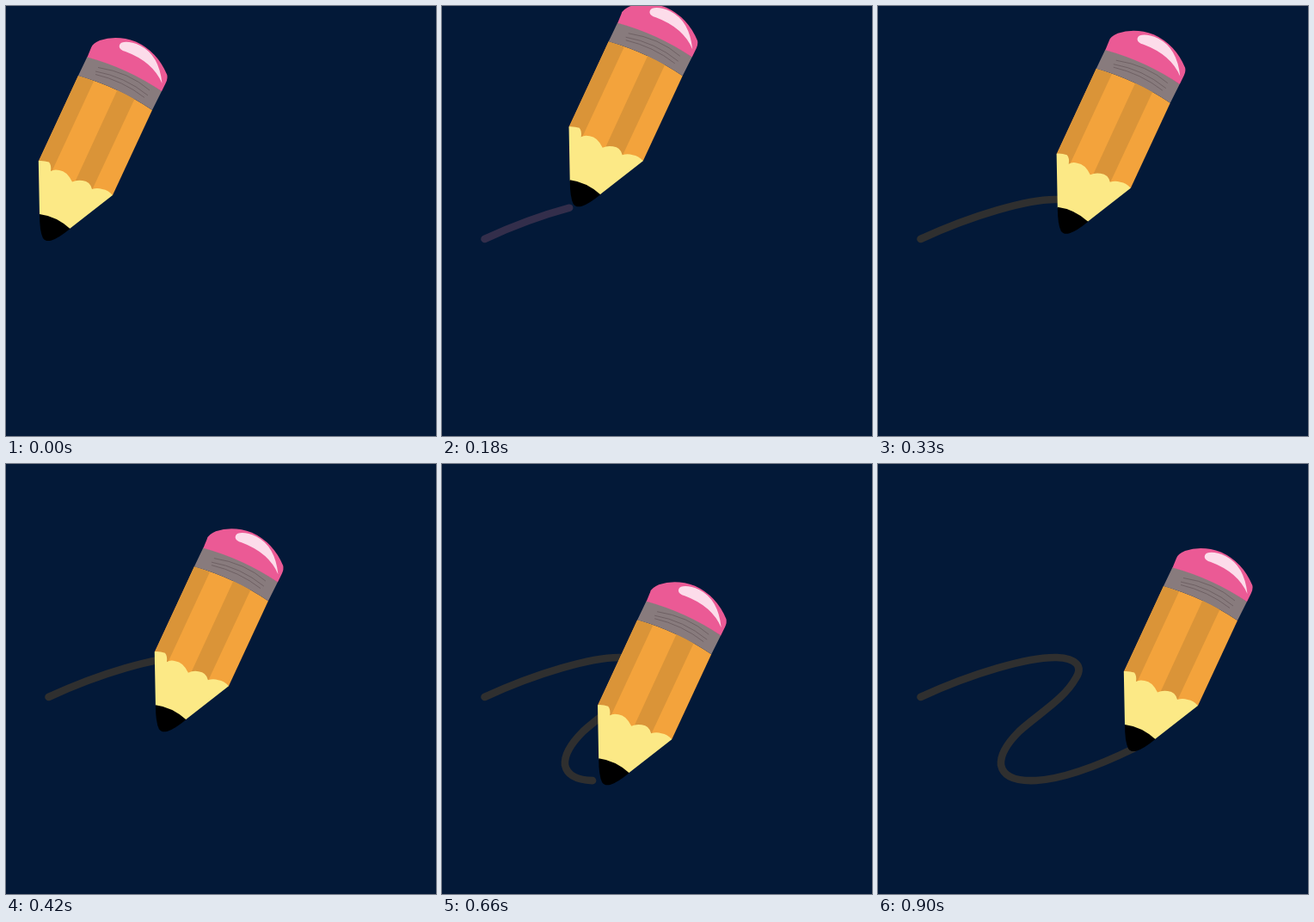
Animation, 500 px wide and 500 px high, one loop 1410 ms. Source, as an HTML page:

```html
<!DOCTYPE html>
<html lang="en">
<head>
<meta charset="utf-8">
<title>Pencil drawing a curve</title>
<style>
  html, body { margin: 0; width: 100%; height: 100%; overflow: hidden; background: #031938; }
  svg { display: block; width: 100%; height: 100%; }
</style>
</head>
<body>
<svg viewBox="0 0 500 500">
  <rect width="500" height="500" fill="#031938"/>
  <path id="line" fill="none" stroke-width="8.6" stroke-linecap="round"
    d="M49.5 271C110 243 176 224 208 225C230 226 239 235 230 249C216 274 187 290 164 311C150 325 142 339 143 350C146 365 164 369 184 368C218 366 262 348 297 331"/>
  <g id="pencil">
    <path fill="#f3a33c" d="M84 81Q130 94 170 121L124 220L80 215L38 180Z"/>
    <path fill="#da9438" d="M84 81Q93 83.5 102 87.5L53 193L38 181ZM129.5 97.5Q140 102 149.5 108L100 214L80 205Z"/>
    <path id="wood" d="M37.8 180Q44 179.5 50 181.5Q53 185 52 192Q56 189.5 62 191Q71 192 77 204.5Q82 202 89 203Q98 204 100 213Q106 211 112 213Q119 214 124 220L74 259L39 243Z"/>
    <path d="M39 242Q58.5 244.5 74.5 259Q61 270 53 272.5Q46 274.5 43 270Q39 262 39 242Z"/>
    <path fill="#887b7d" d="M94.5 59Q142 71 181 99L170 121Q130 94 84 81Z"/>
    <g fill="none" stroke="#6f6164">
      <path d="M107 71.5Q143 77 167 98"/>
      <path d="M104 76Q138 82 165 104"/>
      <path d="M104 79.5Q136 87 161 106.5"/>
    </g>
    <path fill="#eb5a95" d="M94.5 59.5L99 48.5Q100 44 109 40Q129 33.5 151 41.5Q176 53 187.3 80Q188.3 84 186 89L181 99.3Q142 72.5 94.5 59.5Z"/>
    <path fill="#fcdcea" d="M137 42Q145 41 156 46Q178 57 181.5 90Q171 65 139 53Q132 51 131.7 47Q132 42.5 137 42Z"/>
  </g>
</svg>
<script>
  const STEP = 30, LOOP = 1410;   // ms
  const STROKE = 10, LAST = 30;   // steps
  const SPEED = 17.5;             // line length drawn per step

  // Pencil path: one cubic curve per hand stroke, each starting where the last ended
  const start = [0, 0], turn = [174, -24], low = [117, 110], end = [248, 61];
  const strokes = [
    [start, [51, -6], [133, -76], turn],
    [turn, [170, 28], [57, 84], low],
    [low, mix(low, end, 1 / 3), mix(low, end, 2 / 3), end]
  ];

  const [line, pencil, wood] = ['line', 'pencil', 'wood'].map(id => document.getElementById(id));

  function mix(a, b, t) {
    return a.map((v, i) => v + (b[i] - v) * t);
  }

  // de Casteljau evaluation
  function curve(points, t) {
    if (points.length === 1) return points[0];
    return curve(points.slice(1).map((p, i) => mix(points[i], p, t)), t);
  }

  function draw(ms) {
    const s = Math.min(LAST, Math.floor((ms % LOOP) / STEP));
    const n = Math.min(strokes.length - 1, Math.floor(s / STROKE));
    const [x, y] = curve(strokes[n], s / STROKE - n);
    pencil.setAttribute('transform', `translate(${x} ${y})`);
    wood.setAttribute('fill', Math.abs(s - 8) < 2 ? '#f08a85' : '#fce986');
    line.setAttribute('stroke', s < 7 ? '#332e4b' : '#2f2f2f');
    line.setAttribute('stroke-dasharray', `${s * SPEED} 999`);
    line.setAttribute('visibility', s ? 'visible' : 'hidden');
  }

  const origin = performance.now();
  function tick() {
    draw(performance.now() - origin);
    requestAnimationFrame(tick);
  }
  draw(0);
  requestAnimationFrame(tick);
</script>
</body>
</html>
```
